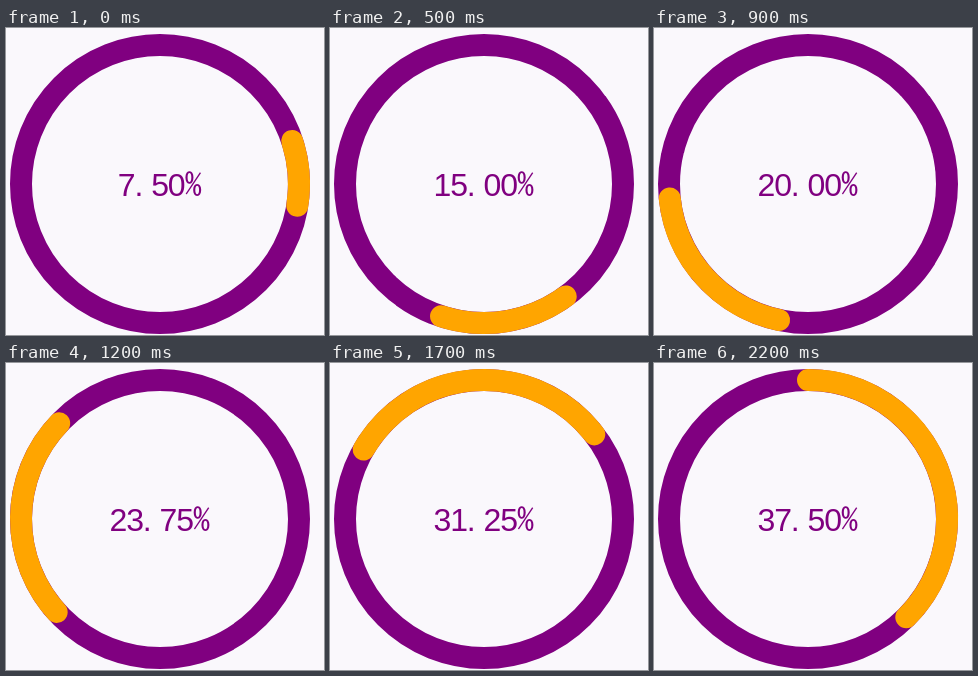
Animation, 318 px wide and 307 px high, one loop 2400 ms. Source, as an HTML page:

```html
<!DOCTYPE html>
<html lang="en">
<head>
<meta charset="utf-8">
<title>Progress ring</title>
<style>
  html, body { margin: 0; width: 100%; height: 100%; overflow: hidden; background: #faf8fc; }
  svg { display: block; }
  circle, path { fill: none; stroke: purple; stroke-width: 22; }
  path { stroke: orange; stroke-linecap: round; }
  text { fill: purple; font: 32px "Liberation Sans", Arial, sans-serif; }
  .sign { font: 33.3px "Noto Sans Mono CJK SC", "Noto Sans Mono CJK JP", "Liberation Mono", monospace; }
</style>
</head>
<body>
<svg width="318" height="307" viewBox="0 0 318 307">
  <circle cx="154" cy="156" r="139"/>
  <path id="arc"/>
  <text y="167.5"><tspan id="digits"></tspan><tspan id="sign" class="sign">%</tspan></text>
</svg>
<script>
  const CX = 154, CY = 156, R = 139, CELL = 16.67;
  const [arc, digits, sign] = ["arc", "digits", "sign"].map(id => document.getElementById(id));

  const point = deg => {
    const a = deg * Math.PI / 180;
    return `${CX + R * Math.cos(a)} ${CY + R * Math.sin(a)}`;
  };

  // Ticks every 100 ms, with two pauses and a few double steps
  function stepAt(ms) {
    let k = Math.floor(ms % 2400 / 100);
    if (k === 15 || k === 23) k--;
    return k + 6 + (k > 1) + (k > 12);
  }

  function draw(n) {
    const start = 12 * n - 90, sweep = 4.5 * n;
    arc.setAttribute("d", `M${point(start)} A${R} ${R} 0 0 1 ${point(start + sweep)}`);

    const label = (n * 1.25).toFixed(2);
    const left = CX - CELL * (label.length + 1) / 2;
    digits.textContent = label;
    digits.setAttribute("x", [...label].map((c, i) => left + CELL * i - 0.5).join(" "));
    sign.setAttribute("x", left + CELL * label.length);
  }

  const begin = performance.now();
  function frame() {
    draw(stepAt(performance.now() - begin));
    requestAnimationFrame(frame);
  }
  frame();
</script>
</body>
</html>
```
